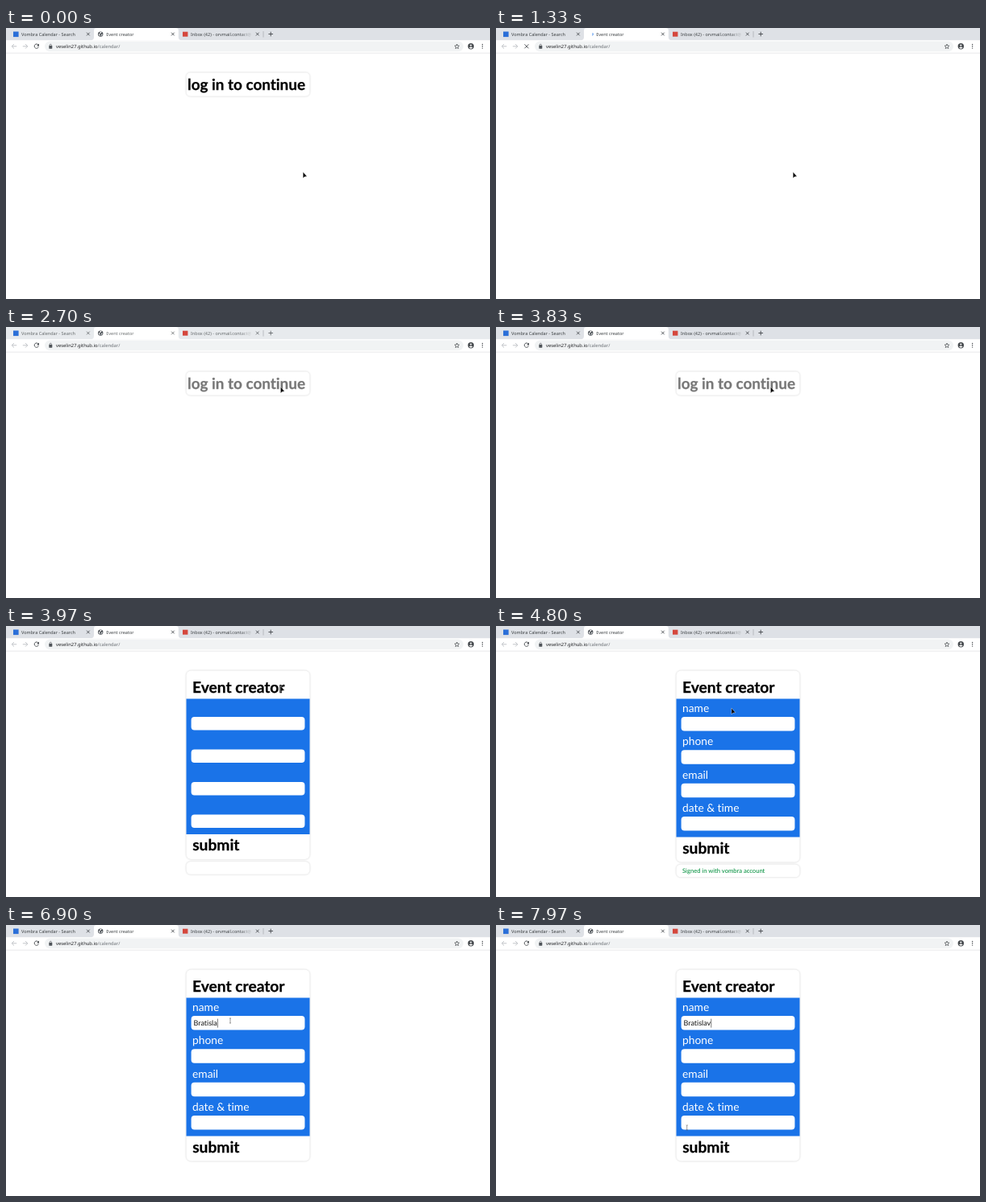
Animation, 600 px wide and 337 px high, one loop 8000 ms. Source, as an HTML page:

```html
<!DOCTYPE html>
<html lang="en">
<head>
<meta charset="utf-8">
<title>Event creator</title>
<style>
html, body { margin: 0; width: 100%; height: 100%; overflow: hidden; background: #fff; }
svg { display: block; width: 100%; height: 100%; }
text { white-space: pre; text-rendering: geometricPrecision; font-variant-ligatures: none; }
.ui { font: 5.5px "Noto Sans", "Open Sans", sans-serif; fill: #3c4043; }
.url { font-size: 5.8px; fill: #202124; }
.page { font-family: Lato, "Open Sans", sans-serif; }
.big { font-size: 19.2px; font-weight: 700; stroke: currentColor; stroke-width: .25; fill: currentColor; }
.label { font-size: 13.8px; fill: #fff; }
.note { font-size: 7.6px; font-weight: 500; fill: #0b9444; }
.typed { font-size: 9px; fill: #111; }
.card { fill: #fff; filter: drop-shadow(0 .9px 1.1px rgba(0, 0, 0, .2)); }
.line { fill: none; stroke: #45494d; stroke-width: .9; }
.pale { stroke: #bdc0c4; }
.away .ui, .away .line { opacity: .75; }
</style>
</head>
<body>
<svg viewBox="0 0 600 337" preserveAspectRatio="none">
  <defs>
    <linearGradient id="fade" gradientUnits="userSpaceOnUse" x1="290" x2="306" y1="0" y2="0">
      <stop stop-color="#3c4043"/><stop offset="1" stop-color="#3c4043" stop-opacity="0"/>
    </linearGradient>
    <clipPath id="tabClip"><rect x="229" width="77" height="15"/></clipPath>
  </defs>

  <rect width="600" height="337" fill="#fff"/>
  <rect id="strip" width="600" height="15.2" fill="#dee1e6"/>
  <path d="M105 15.2Q109 15.2 109 11.5V3.2Q109 0 112.2 0H210.6Q213.8 0 213.8 3.2V11.5Q213.8 15.2 217.8 15.2Z" fill="#fff"/>

  <g id="tabs">
    <rect x="9" y="4.5" width="6.6" height="6.6" fill="#2b6fd8"/>
    <text class="ui" x="19" y="9.7">Vombra Calendar - Search</text>
    <g id="globe">
      <circle cx="117.2" cy="7.6" r="3.2" fill="#50555a"/>
      <path d="M114.9 6.7l1.7 1.6v1.6l-1.5-1.2zM117 4.9l1.4.1-.3 1.3-1.3.8-.8-.7zM118 8l1.7-.2-.8 1.8-.9-.3z" fill="#fff"/>
    </g>
    <path id="spinner" fill="none" stroke-width=".9"/>
    <text class="ui" x="124.2" y="9.7">Event creator</text>
    <rect x="219" y="4.7" width="6.4" height="6" fill="#d5473d"/>
    <g clip-path="url(#tabClip)">
      <text class="ui" x="229" y="9.7" style="fill:url(#fade)">Inbox (42) - orvmail.contact@</text>
    </g>
    <path class="line" d="M100 5.7l3.7 3.7m0-3.7l-3.7 3.7M205 5.7l3.7 3.7m0-3.7l-3.7 3.7M309.9 5.7l3.7 3.7m0-3.7l-3.7 3.7M325.4 7.5h5.6m-2.8-2.8v5.6"/>
    <path d="M319 4v7.5" stroke="#9a9ea4" stroke-width=".6"/>
  </g>

  <rect x="48" y="16.6" width="519" height="12.6" rx="6.3" fill="#f1f3f4"/>
  <path d="M0 31.2H600" stroke="#dadce0" stroke-width=".6"/>
  <path class="line pale" d="M13.2 22.8H7.2m2.8-2.8l-2.8 2.8 2.8 2.8M20.8 22.8h6m-2.8-2.8l2.8 2.8-2.8 2.8"/>
  <g id="reload">
    <path class="line" d="M40.1 21.1A2.7 2.7 0 1 0 40.4 23.6"/>
    <path d="M41 19.6v2.9h-2.9z" fill="#45494d"/>
  </g>
  <path id="stop" class="line" d="M35.4 20.3l5 5m0-5l-5 5"/>
  <rect x="53.3" y="22.1" width="4" height="3.6" rx=".4" fill="#50555a"/>
  <path class="line" style="stroke-width:.6" d="M54.2 22.2v-.9a1.1 1.1 0 0 1 2.2 0v.9"/>
  <text class="ui url" x="62" y="24.9">veselin27.github.io<tspan fill="#6b7075">/calendar/</tspan></text>
  <path class="line" style="stroke-width:.7" d="M559 20l.8 2 2.1.1-1.6 1.4.5 2.1-1.8-1.1-1.8 1.1.5-2.1-1.6-1.4 2.1-.1z"/>
  <circle cx="576.3" cy="22.8" r="3.7" fill="#45494d"/>
  <circle cx="576.3" cy="21.5" r="1.1" fill="#fff"/>
  <path d="M574 24.6q2.3-2 4.6 0q-2.3 2.2-4.6 0z" fill="#fff"/>
  <g fill="#45494d"><circle cx="590.6" cy="20.5" r=".7"/><circle cx="590.6" cy="22.8" r=".7"/><circle cx="590.6" cy="25.1" r=".7"/></g>

  <g class="page">
    <g id="login">
      <rect class="card" x="223.5" y="55.5" width="153" height="29.3" rx="5"/>
      <text id="loginText" class="big" style="font-size:18.9px" x="225" y="77">log in to continue</text>
    </g>
    <g id="form">
      <rect id="panel" class="card" x="223.5" y="55.5" width="153" rx="6"/>
      <rect id="blue" x="223.5" y="90.5" width="153" fill="#1a73e8"/>
      <text class="big" x="231" y="83">Event creator</text>
      <g id="fields"></g>
      <text id="submit" class="big" x="231.2">submit</text>
      <text id="typed" class="typed" x="232.5" y="125"></text>
      <rect id="caret" y="116.6" width=".7" height="11" fill="#444"/>
      <g id="notice">
        <rect id="noticeCard" class="card" x="223.5" width="153" height="15.8" rx="5.5"/>
        <text id="noticeText" class="note" x="231" y="307.2">Signed in with vombra account</text>
      </g>
    </g>
  </g>

  <path id="arrow" d="M0 0V7.8L1.9 6L4.9 5.6Z" fill="#000" stroke="#fff" stroke-width=".4" stroke-linejoin="round"/>
  <path id="beam" d="M-1-3.2Q0-3.2 0-2.6Q0-3.2 1-3.2M0-2.6V2.6M-1 3.2Q0 3.2 0 2.6Q0 3.2 1 3.2" fill="none" stroke="#555" stroke-width=".6"/>
</svg>
<script>
const LOOP = 8000;
const $ = id => document.getElementById(id);
const set = (el, attrs) => { for (const k in attrs) el.setAttribute(k, attrs[k]); };
const show = (id, on) => { $(id).style.display = on ? '' : 'none'; };
const between = (t, a, b) => t >= a && t < b;

const T = {
  reload: 700, blank: 1300, ready: 1700, loaded: 1790,
  hover: 2190, blur: 2700, focus: 3830,
  form: 3970, labels: 4030, noticeEnd: 5030, field: 5200
};

const NAME = 'Bratislav';
const KEYS = [5970, 6300, 6400, 6600, 6670, 6750, 6830, 6900, 6970];
const BLINK = 365;

// time, x, y of the pointer
const PATH = [
  [0, 368.2, 179], [1700, 368.2, 179], [1860, 387, 156], [1980, 398, 130],
  [2110, 383, 98], [2230, 354, 78], [2330, 342, 74], [2370, 340.4, 74.4],
  [4600, 340.4, 74.4], [4700, 319, 86], [4800, 292, 102], [4950, 282, 111],
  [5200, 278, 119], [7670, 278, 119], [7760, 269, 150], [7880, 246, 220],
  [7970, 236.7, 252], [LOOP, 236.7, 252]
];

const fields = ['name', 'phone', 'email', 'date & time'].map(label => {
  const make = tag => $('fields').appendChild(document.createElementNS('http://www.w3.org/2000/svg', tag));
  const text = make('text'), box = make('rect');
  text.textContent = label;
  set(text, { class: 'label', x: 231 });
  set(box, { x: 229.6, width: 140.8, rx: 4, fill: '#fff' });
  return { text, box };
});

function layout(full) {
  const step = full ? 41.35 : 40.5;
  fields.forEach(({ text, box }, i) => {
    set(text, { y: 107 + i * step });
    text.style.display = full ? '' : 'none';
    set(box, { y: 113 + i * step, height: full ? 17.5 : 16.6 });
  });
  const end = full ? 262.5 : 259;
  set($('blue'), { height: end - 90.5 });
  set($('panel'), { height: end + 31 - 55.5 });
  set($('submit'), { y: end + 20.3 });
  set($('noticeCard'), { y: end + 34 });
  show('noticeText', full);
}

function pointer(t) {
  const i = Math.max(1, PATH.findIndex(p => p[0] > t));
  const [a, x0, y0] = PATH[i - 1], [b, x1, y1] = PATH[i];
  const k = (t - a) / (b - a);
  return [x0 + (x1 - x0) * k, y0 + (y1 - y0) * k];
}

function arc(from, sweep) {
  const at = deg => {
    const r = deg * Math.PI / 180;
    return (117.2 + 3 * Math.cos(r)).toFixed(2) + ' ' + (7.6 + 3 * Math.sin(r)).toFixed(2);
  };
  return `M${at(from)}A3 3 0 ${sweep > 180 ? 1 : 0} 1 ${at(from + sweep)}`;
}

function drawTabs(t) {
  const loading = between(t, T.reload, T.loaded), away = between(t, T.blur, T.focus);
  show('globe', !loading);
  show('reload', !loading);
  show('stop', loading);
  show('spinner', loading);
  if (loading) {
    const waiting = t < T.blank, d = t - (waiting ? T.reload : T.blank);
    set($('spinner'), {
      d: waiting ? arc(-90 - d * .36, 90) : arc(-35 + d * .3, 50 + d * .35),
      stroke: waiting ? '#80868b' : '#1a73e8'
    });
  }
  set($('strip'), { fill: away ? '#e7eaed' : '#dee1e6' });
  set($('tabs'), { class: away ? 'away' : '' });
}

function drawPage(t) {
  const open = t >= T.form;
  show('login', !open && !between(t, T.blank, T.ready));
  const grey = Math.round(119 * Math.min(1, Math.max(0, (t - T.hover) / 150)));
  $('loginText').style.color = `rgb(${grey},${grey},${grey})`;

  show('form', open);
  if (!open) return;
  layout(t >= T.labels);
  show('notice', t < T.noticeEnd);

  const count = KEYS.filter(k => k <= t).length;
  const last = count ? KEYS[count - 1] : T.field;
  $('typed').textContent = NAME.slice(0, count);
  show('caret', t >= T.field && (t - last) % (2 * BLINK) < BLINK);
  const width = count ? $('typed').getComputedTextLength() : 0;
  set($('caret'), { x: 232.7 + width });
}

function drawPointer(t) {
  const [x, y] = pointer(t);
  const overField = t >= T.form && fields.some(({ box }) => {
    const top = +box.getAttribute('y');
    return between(y, top, top + 17.5);
  });
  show('arrow', !overField);
  show('beam', overField);
  set($(overField ? 'beam' : 'arrow'), { transform: `translate(${x} ${y})` });
}

const start = performance.now();
function frame() {
  const t = (performance.now() - start) % LOOP;
  drawTabs(t);
  drawPage(t);
  drawPointer(t);
  requestAnimationFrame(frame);
}
frame();
</script>
</body>
</html>
```
